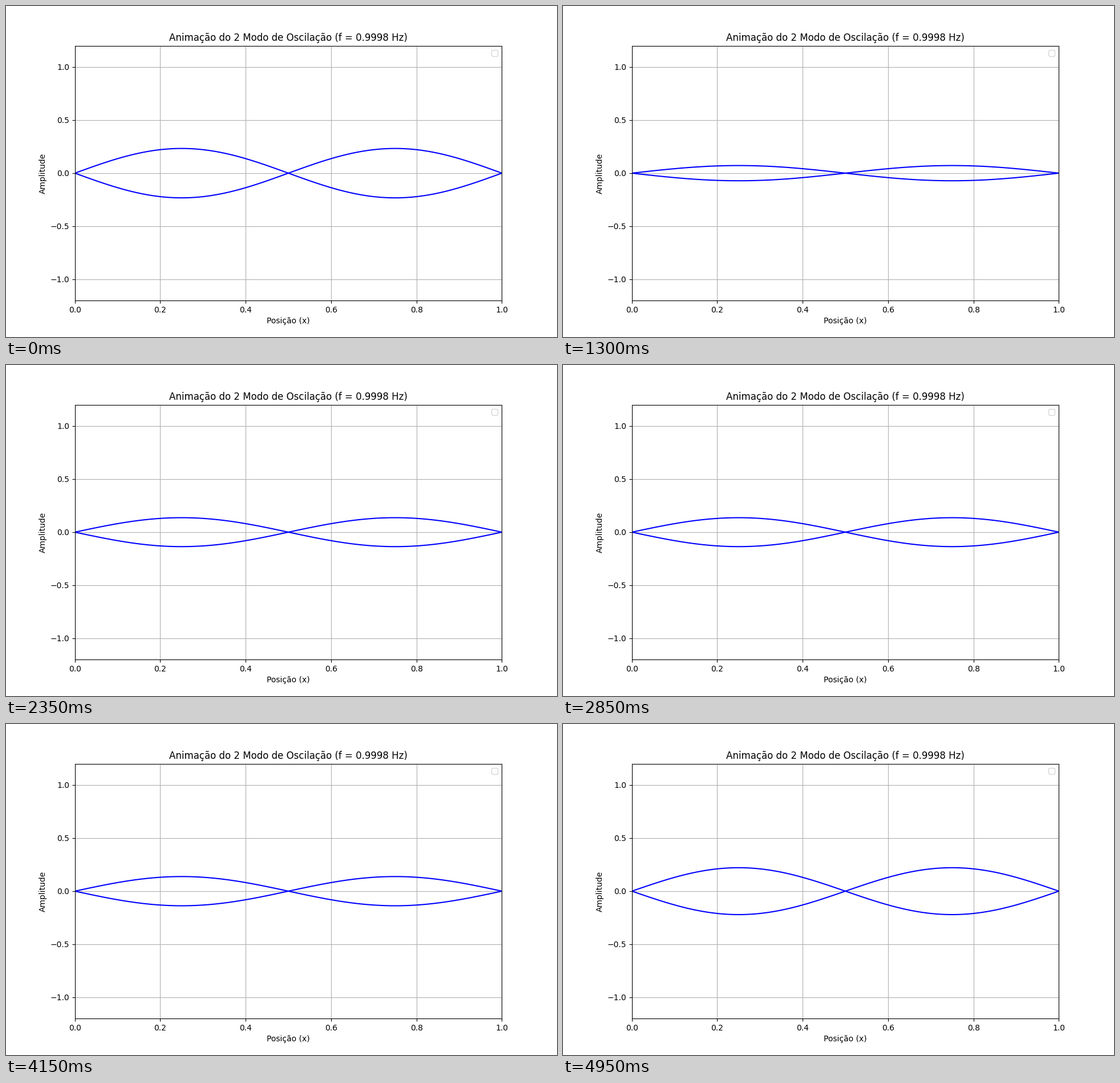
Recreate the animation shown at these times as a matplotlib script. Size 966x580 px, loop 5000 ms.

```python
import numpy as np
import matplotlib.pyplot as plt
from matplotlib.animation import FuncAnimation

FRAMES = 100
INTERVAL = 50  # ms
MODE = 2
FREQ = 0.99983  # Hz
PEAK = 0.2326

x = np.linspace(0, 1, 101)
shape = PEAK * np.sin(MODE * np.pi * x)

fig, ax = plt.subplots(figsize=(9.66, 5.8), dpi=100)
ax.set_xlim(0, 1)
ax.set_ylim(-1.2, 1.2)
ax.set_title(f"Animação do {MODE} Modo de Oscilação (f = {FREQ:.4f} Hz)")
ax.set_xlabel("Posição (x)")
ax.set_ylabel("Amplitude")
ax.grid(True)
ax.legend(handles=[], loc="upper right")

upper, = ax.plot(x, shape, color="blue")
lower, = ax.plot(x, -shape, color="blue")


def update(frame):
    t = frame * INTERVAL / 1000
    y = shape * np.cos(2 * np.pi * FREQ * t)
    upper.set_ydata(y)
    lower.set_ydata(-y)
    return upper, lower


anim = FuncAnimation(fig, update, frames=FRAMES, interval=INTERVAL,
                     repeat=True, repeat_delay=0)
plt.show()
```
